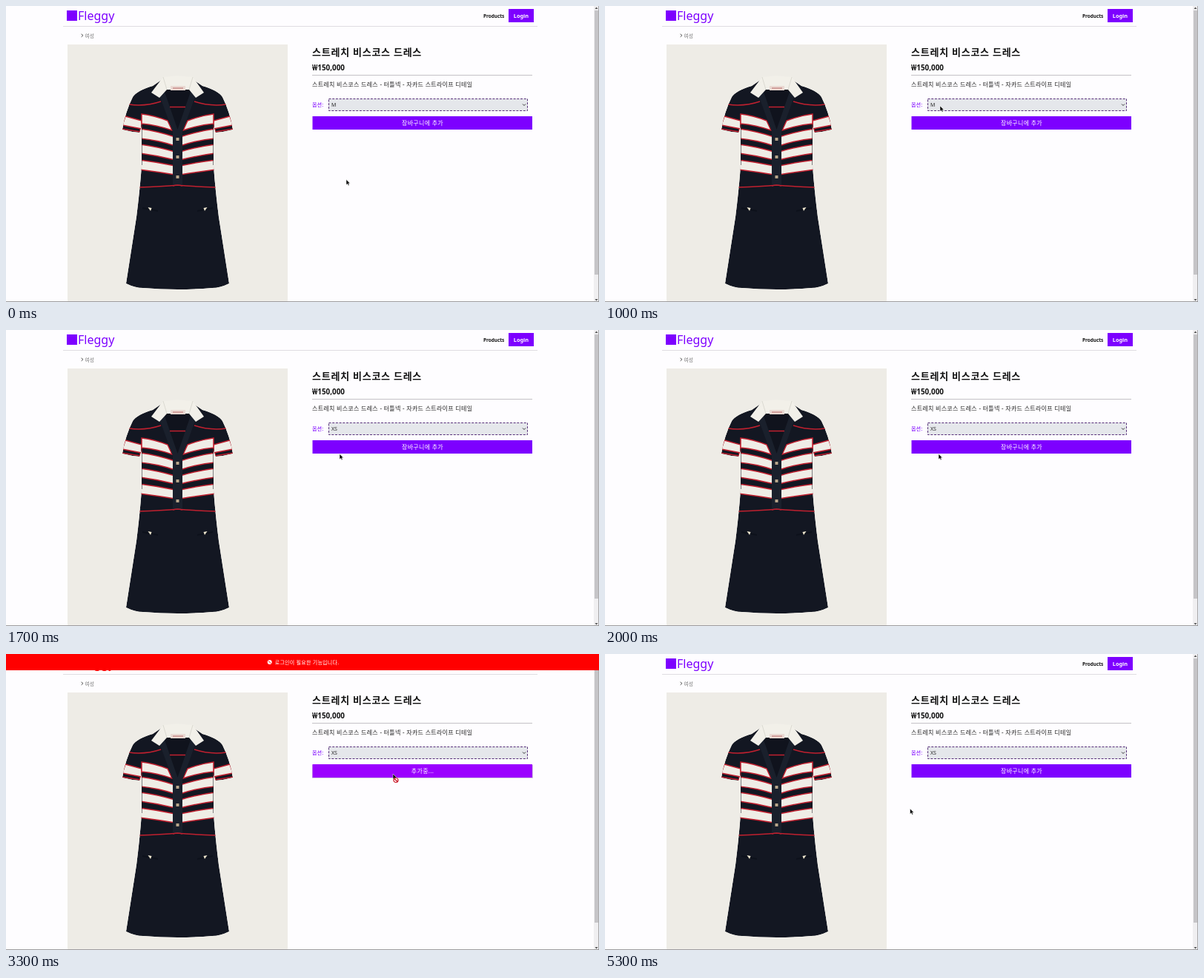
Animation of 800x400 px, one loop 6.3 s. Source, as an HTML page:

```html
<!DOCTYPE html>
<html lang="ko">
<head>
<meta charset="utf-8">
<title>Product page</title>
<style>
  html, body { margin: 0; width: 100%; height: 100%; overflow: hidden; background: #fefdff; }
  svg { display: block; width: 100%; height: 100%; }
  text { font: 7px "Noto Sans", "Noto Sans CJK KR", sans-serif; fill: #222; }
  .bold { font-weight: 700; }
  .mid { text-anchor: middle; }
  .red { fill: none; stroke: #c0202f; stroke-width: 1.5; }
  .band { fill: #efede6; stroke: #c0202f; stroke-width: 1.5; }
</style>
</head>
<body>
<svg viewBox="0 0 800 400">
  <defs>
    <clipPath id="dress">
      <path id="outline" d="M211 99L198 108Q177 114 171 123Q161 143 157 167Q168 170 180 171L183 163V215Q181 245 176 285Q169 330 162 375Q174 381 185 381Q231 385 278 381Q289 381 301 375Q294 330 287 285Q282 245 280 215V163L283 171Q295 170 306 167Q302 143 292 123Q286 114 265 108L252 99Z"/>
    </clipPath>
    <g id="half">
      <path class="red" d="M166 133Q188 136 209 129M156 166L181 170M179 245Q210 244 232 242"/>
      <path class="band" d="M161 149L183 155V166L157 161Z"/>
      <path class="band" d="M183 146Q200 148 218 155L224 168Q204 161 183 159Z"/>
      <path class="band" d="M181 166Q204 169 228 177V189Q204 181 181 179Z"/>
      <path class="band" d="M181 187Q204 190 228 197V208Q204 202 181 199Z"/>
      <path class="band" d="M180 208Q204 211 228 216V228Q204 224 180 221Z"/>
      <path d="M183 160V215" stroke="#10141f" fill="none"/>
      <path d="M184 272L205 276V278L184 274Z" fill="#0d111b"/>
      <path d="M191.500 272L196.500 273L195 277Z" fill="#eee7d0"/>
    </g>
  </defs>

  <!-- Header -->
  <rect x="82" y="6" width="14" height="14" fill="#7d00ff"/>
  <text id="brand" x="97" y="19" style="font-size:16px">Fleggy</text>
  <text class="bold" x="644" y="16" style="font-size:6.4px;fill:#111">Products</text>
  <rect x="678" y="4" width="34" height="18" fill="#7d00ff"/>
  <text class="bold mid" x="695" y="16" style="font-size:7.3px;fill:#fff">Login</text>
  <path d="M77 27.500H717" stroke="#dfdde1"/>
  <path d="M101.700 37.800L103.800 39.800L101.700 41.800" fill="none" stroke="#444"/>
  <text x="106.500" y="42.500" style="font-size:6.8px;fill:#777">여성</text>

  <!-- Product picture -->
  <path d="M83 52H380V399H83Z" fill="#eeece6"/>
  <g clip-path="url(#dress)">
    <use href="#outline" fill="#131722"/>
    <use href="#half"/>
    <use href="#half" transform="translate(463) scale(-1 1)"/>
    <path d="M204 112L225 170V242H238V170L259 112Z" fill="#1a202c"/>
    <path d="M213 113L231.500 167L250 113Z" fill="#10131d"/>
    <path class="red" d="M221 136.500H242"/>
    <path class="red" d="M225 243Q231.500 241 238 243"/>
  </g>
  <path d="M212 96Q231 93 252 96L267 117L256 124L247 113H217L207 124L196 117Z" fill="#f2f0e9"/>
  <path d="M212 96L217 113M252 96L247 113" stroke="#d5d3cb" stroke-width=".8"/>
  <path d="M222 108H242V114H222Z" fill="#ead9d2"/>
  <path d="M225 111H239" stroke="#bd6a68"/>
  <path d="M229.500 178h4v4h-4zm0 24h4v4h-4zm0 27h4v4h-4z" fill="#b9a58a"/>

  <!-- Product details -->
  <text class="bold" x="413" y="67" style="font-size:13px;letter-spacing:.75px;fill:#111">스트레치 비스코스 드레스</text>
  <text class="bold" x="413" y="87" style="font-size:9.9px;fill:#111">₩150,000</text>
  <path d="M413 93.500H710" stroke="#c4c2c6"/>
  <text x="413" y="108.500" style="font-size:8px;letter-spacing:.3px">스트레치 비스코스 드레스 - 터틀넥 - 자카드 스트라이프 디테일</text>
  <text x="413" y="136" style="font-size:7.2px;font-weight:500;fill:#7d00ff">옵션:</text>
  <rect id="select" x="435.500" y="125.500" width="268" height="16" fill="#e5e7eb" stroke-dasharray="3 1.7"/>
  <text id="choice" x="439" y="136.200"></text>
  <path d="M697 132.500L699 134.500L701 132.500" fill="none" stroke="#333"/>
  <rect id="shadow" x="413" y="150" width="298" height="18" fill="#5a3a80" opacity=".25"/>
  <rect id="button" x="413.500" y="149" width="296.500" height="18"/>
  <text id="action" class="mid" x="562" y="161" style="font-size:8px;letter-spacing:.3px;fill:#fff"></text>

  <g id="menu">
    <rect x="435" y="143.500" width="267.500" height="81.500" rx="1" fill="#f7f7f8" stroke="#a5a5a8"/>
    <rect id="highlight" x="435.500" width="266.500" height="13.200" fill="#d8d8dd"/>
  </g>

  <!-- Scrollbar and window edge -->
  <path d="M793 0H800V400H793Z" fill="#f0eff1"/>
  <path d="M794 6H799V363H794Z" fill="#c5c4c7"/>
  <path d="M794.500 4L796.500 1.500L798.500 4ZM794.500 396L796.500 398.500L798.500 396Z" fill="#555"/>
  <path d="M0 399.500H800M799.700 0V400" stroke="#858487" stroke-width=".8"/>

  <g id="banner">
    <path d="M0 0H800V22H0Z" fill="#f00"/>
    <circle cx="355.700" cy="11" r="3" fill="#fff"/>
    <path d="M354 9.300L357.400 12.700" stroke="#f00"/>
    <text class="mid" x="406" y="13.500" style="letter-spacing:.25px;fill:#fff">로그인이 필요한 기능입니다.</text>
  </g>

  <g id="cursor">
    <path id="arrow" d="M0 0V7.200L1.700 5.700L2.900 8.200L4.100 7.600L3 5.200H5.200Z" stroke="#fff" stroke-width=".5"/>
    <path id="hand" d="M.2-1Q1-1.800 1.800-1V2L5 2.800Q6 3.200 5.700 5L5 8.500H.3L-2.400 4.500Q-2 3-.5 4.200L.2 4.700Z" stroke="#fff" stroke-width=".4"/>
    <g id="blocked" fill="#fff" stroke="#c91525" stroke-width="1.200">
      <circle cx="4" cy="8.500" r="3"/>
      <path d="M2 6.500L6 10.500"/>
    </g>
  </g>
</svg>
<script>
const LOOP = 6300, STEP = 100, ROW = 13.2, MENU_TOP = 144.2;
const options = ['--선택--', 'XS', 'S', 'M', 'L', 'XL'];
// Pointer path: time, x, y
const path = [
  [0, 459, 234.5], [400, 459, 234.5], [500, 457, 205], [600, 455, 158],
  [700, 454, 141.5], [1000, 452, 135], [1200, 452, 137], [1300, 453, 153],
  [1500, 450, 167.5], [2400, 450, 167.5], [2600, 480, 164], [3000, 522, 162],
  [4600, 522, 162], [4800, 480, 182], [5100, 411.5, 209], [LOOP, 411.5, 209]
];
const el = id => document.getElementById(id);
const show = (id, on) => el(id).style.display = on ? '' : 'none';
const fill = (id, color) => el(id).style.fill = color;

options.forEach((label, i) => {
  const row = document.createElementNS('http://www.w3.org/2000/svg', 'text');
  row.textContent = label;
  row.setAttribute('x', 439);
  row.setAttribute('y', 153.5 + i * ROW);
  el('menu').append(row);
});

function pointerAt(time) {
  const i = Math.max(1, path.findIndex(key => key[0] >= time));
  const [t0, x0, y0] = path[i - 1], [t1, x1, y1] = path[i];
  const k = (time - t0) / (t1 - t0);
  return [x0 + (x1 - x0) * k, y0 + (y1 - y0) * k];
}

function overButton(time) {
  const [x, y] = pointerAt(Math.max(0, time));
  return x > 413 && x < 710 && y > 149 && y < 167;
}

function draw(now) {
  const time = Math.floor(now % LOOP / STEP) * STEP;
  const [x, y] = pointerAt(time);
  const open = time >= 1200 && time < 1700;
  const busy = time >= 3200 && time < 4300;
  const over = !open && overButton(time);
  // The hover colour fades out one step late.
  const lit = over || !open && overButton(time - STEP);

  show('menu', open);
  const row = time < 1300 ? 3 : Math.floor((y - MENU_TOP) / ROW);
  el('highlight').setAttribute('y', MENU_TOP + row * ROW);
  el('choice').textContent = time < 1700 ? 'M' : 'XS';
  fill('choice', open ? '#111' : '#2a2a2a');
  el('select').style.stroke = open ? '#7010c0' : '#57307a';

  fill('button', lit ? '#9b00ff' : '#7d00ff');
  show('shadow', lit);
  el('action').textContent = busy ? '추가중...' : '장바구니에 추가';
  show('banner', busy);
  fill('brand', busy ? '#f00' : '#7d00ff');

  el('cursor').setAttribute('transform', `translate(${x} ${y})`);
  show('hand', over && !busy);
  show('arrow', !over || busy);
  show('blocked', busy);
}

function tick() {
  draw(performance.now());
  requestAnimationFrame(tick);
}
tick();
</script>
</body>
</html>
```
